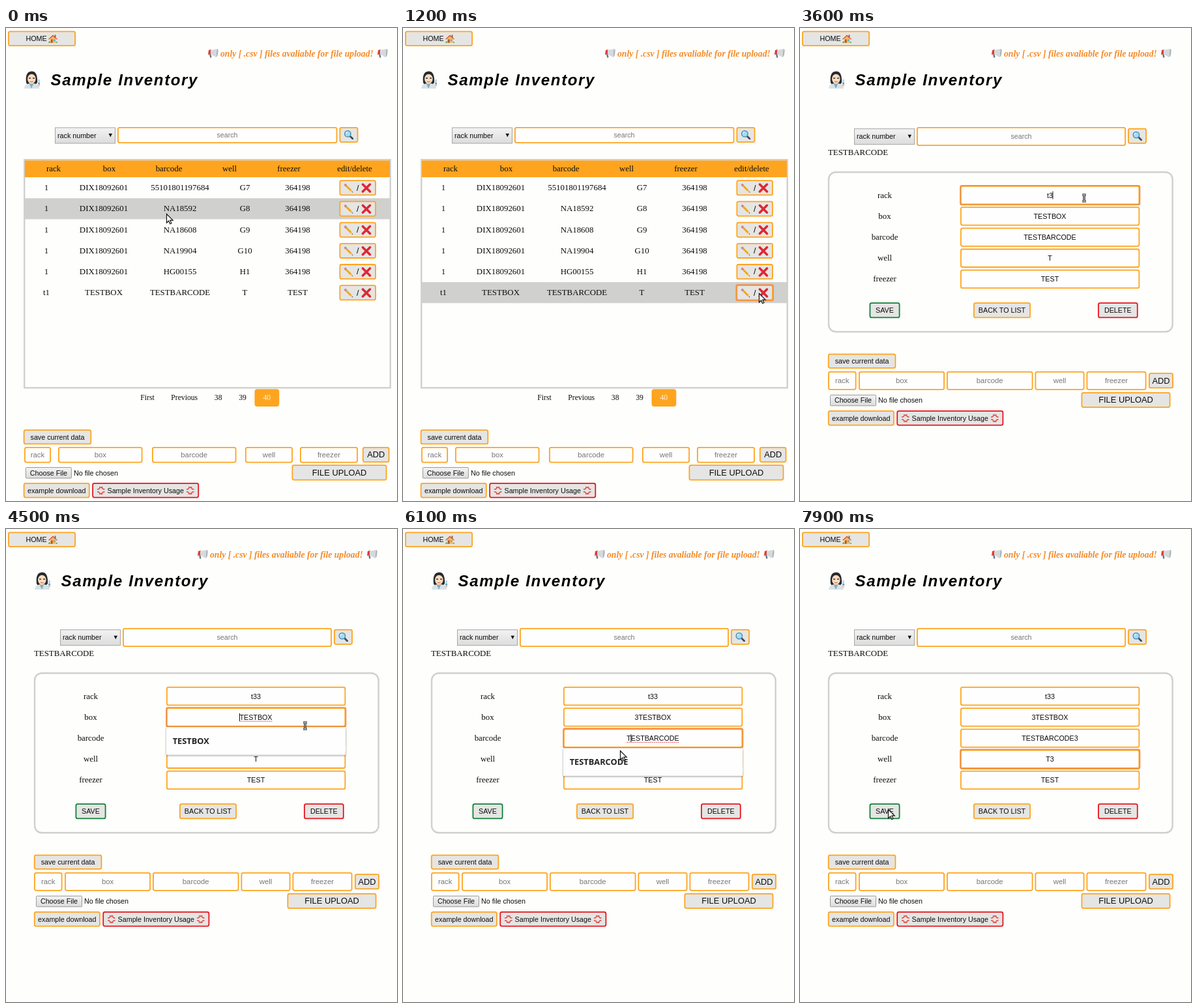
An HTML page that plays this animation: 600x726 px, repeating every 8000 ms.

```html
<!DOCTYPE html>
<html lang="en">
<head>
<meta charset="utf-8">
<title>Sample Inventory</title>
<style>
  html, body { margin: 0; width: 100%; height: 100%; overflow: hidden; background: #fefefd; }
  svg { display: block; }
  text { font: 10.72px "Liberation Sans", Arial, sans-serif; fill: #0c0c0c; white-space: pre; }
  .mid { text-anchor: middle; }
  .big { font-size: 12.86px; }
  .hint { font-size: 11.3px; fill: #777; }
  .serif { font: 12.86px "Liberation Serif", Times, serif; }
  .pager { font: 11.7px "Liberation Serif", Times, serif; }
  .current { fill: #fff3dd; }
  .notice { font: italic bold 13.67px "Liberation Serif", Times, serif; fill: #f58a26; }
  .title { font: italic bold 24.1px "Liberation Sans", Arial, sans-serif; letter-spacing: 1.61px; fill: #000; }
  .option { font: 600 12.8px "Noto Sans", sans-serif; fill: #222; }
  .popup { filter: drop-shadow(0 1px 1.5px #0006); }
</style>
</head>
<body>
<svg width="600" height="726" viewBox="0 0 600 726">
  <defs>
    <linearGradient id="grey" x2="0" y2="1">
      <stop stop-color="#f3f3f3"/><stop offset="1" stop-color="#dcdcdc"/>
    </linearGradient>
    <symbol id="house" viewBox="0 0 16 16">
      <path d="M11 1h2v5h-2z" fill="#8a5140"/>
      <path d="M3 7 8 3l5 4v8H3z" fill="#f4b860"/>
      <path d="M0 8.5 8 1l8 7.5-1 1-7-6-7 6z" fill="#d9512f"/>
      <path d="M4.500 9h3v6h-3z" fill="#a4563a"/><path d="M9 9h3v3H9z" fill="#5cb2d8"/>
      <path d="M0 14q3-4 4 1H0zM13 15q1-4 3-1v1z" fill="#65a844"/>
    </symbol>
    <symbol id="horn" viewBox="0 0 18 16">
      <path d="M2 3 6 2 5 9 1 10z" fill="#df3c38"/>
      <path d="M5 3 15 1l2 1-2 11-2 1-8-5z" fill="#d5d9dc"/>
      <path d="M15 1q3 2 0 12-2-1 0-12z" fill="#aab2b7"/>
      <path d="M3 9.500 5.500 9l1 5-2 1z" fill="#68747a"/>
    </symbol>
    <symbol id="scientist" viewBox="0 0 27 27">
      <path d="M4 18Q2 1 12 0.500T21 18l-3 3H6z" fill="#292a2f"/>
      <path d="M1 27q0-7 8-8h7q8 1 8 8z" fill="#d5e3ea"/>
      <path d="M9 17h6v4l-3 3-3-3z" fill="#e7b792"/>
      <ellipse cx="12.300" cy="12" rx="6.300" ry="7.300" fill="#f9dcc0"/>
      <path d="M5.500 11Q7 5 12 4q5 1 7 6-1-8-7-8t-6.500 9z" fill="#292a2f"/>
      <path d="M8 11h3M14 11h3" stroke="#383030" stroke-width="1.500"/>
      <path d="M10 16q2.300 1.500 4.600 0" stroke="#c0504c" fill="none"/>
      <path d="m9 20 3 7 3-7" fill="#80aebe"/>
      <path d="M22 13h3v10h-3z" fill="#b5dbe7"/><path d="M22 18h3v5h-3z" fill="#5ea6c8"/>
      <circle cx="23" cy="22" r="2" fill="#f3cba8"/>
    </symbol>
    <symbol id="lens" viewBox="0 0 16 16">
      <path d="m9.500 9.500 5 5" stroke="#454b50" stroke-width="3" stroke-linecap="round"/>
      <circle cx="6.300" cy="6.300" r="5" fill="#a5dcf4" stroke="#4b91b8" stroke-width="1.600"/>
      <path d="M3.500 6q0-2.500 2.500-3" stroke="#fff" fill="none"/>
    </symbol>
    <symbol id="pencil" viewBox="0 0 16 16">
      <path d="M0.500 3 3 0.500 5.500 3 3 5.500z" fill="#e8777a"/>
      <path d="M2.200 4.700 4.700 2.200 6 3.500 3.500 6z" fill="#9ca6aa"/>
      <path d="M3.500 6 6 3.500 13.500 11 11 13.500z" fill="#f7b62c"/>
      <path d="m4.700 4.800 7.600 7.500" stroke="#dc8d20"/>
      <path d="m11 13.500 2.500-2.500 2 4.500z" fill="#e8c59a"/><path d="m13.500 14.600 1-1 1 2z" fill="#333"/>
    </symbol>
    <symbol id="cross" viewBox="0 0 16 16">
      <path d="m2.500 2.500 11 11m0-11-11 11" stroke="#dc2932" stroke-width="3.600" stroke-linecap="round"/>
    </symbol>
    <symbol id="anger" viewBox="0 0 16 16">
      <g fill="none" stroke="#e0433d" stroke-width="1.700" stroke-linecap="round">
        <path d="M1.500 5.500Q6 6 5.500 1.500M10.500 1.500Q10 6 14.500 5.500M1.500 10.500Q6 10 5.500 14.500M10.500 14.500Q10 10 14.500 10.500"/>
        <path d="M7 1.500Q8 4 9 1.500M7 14.500Q8 12 9 14.500"/>
      </g>
    </symbol>
    <symbol id="arrow" viewBox="0 0 12 18" overflow="visible">
      <path d="M.5.500v13.500l3.200-3 2 4.700 2.200-1-2-4.500h4.300z" fill="#fff" stroke="#111" stroke-width="1.200"/>
    </symbol>
    <symbol id="beam" viewBox="0 0 10 14">
      <path d="M2 2h6M2 12h6M5 2v10" stroke="#111" stroke-width="3.200"/>
      <path d="M2 2h6M2 12h6M5 2v10" stroke="#fff" stroke-width="1"/>
    </symbol>
  </defs>
  <g id="scene"></g>
</svg>
<script>
const scene = document.getElementById('scene');
const LOOP = 8000, STEP = 100, EDIT_AT = 1300, PRESS_AT = 1200, ROW = 32.2;
const ORANGE = '#fea41f', RED = '#e5161d', GREEN = '#11803a', GREY = '#e5e5e4', LINE = '#d0d0d0';
const FIELDS = ['rack', 'box', 'barcode', 'well', 'freezer'];
const SAMPLES = [
  ['1', 'DIX18092601', '55101801197684', 'G7', '364198'],
  ['1', 'DIX18092601', 'NA18592', 'G8', '364198'],
  ['1', 'DIX18092601', 'NA18608', 'G9', '364198'],
  ['1', 'DIX18092601', 'NA19904', 'G10', '364198'],
  ['1', 'DIX18092601', 'HG00155', 'H1', '364198'],
  ['t1', 'TESTBOX', 'TESTBARCODE', 'T', 'TEST']
];

// time, x, y of the pointer
const PATH = [
  [0, 246, 285], [800, 500, 668], [900, 500, 668], [1000, 530, 500], [1100, 546, 407],
  [1600, 546, 407], [2200, 436, 261], [4000, 436, 261], [4500, 459, 302], [4900, 459, 302],
  [5300, 505, 322], [5700, 256, 328], [5900, 349, 322], [6100, 333, 340], [6700, 333, 340],
  [7000, 367.5, 354], [7200, 367.5, 354], [7600, 145, 460], [7900, 135, 430]
];

// time, focused field, its value, caret index, suggestion
const EDITS = [
  [2500, 0, 't1', 2, 't1'], [3200, 0, 't', 1, 't1'], [3600, 0, 't3', 2], [3800, 0, 't33', 3],
  [4300, 1, 'TESTBOX', 0, 'TESTBOX'], [4900, 1, '3TESTBOX', 1],
  [5900, 2, 'TESTBARCODE', 1, 'TESTBARCODE'], [6600, 2, 'TESTBARCODE3', 12],
  [6900, 3, 'T', 0, 'T'], [7300, 3, 'T', 1, 'T'], [7500, 3, 'T3', 2], [7700, 3, 'T3', -1]
];

const rect = (x, y, x2, y2, attrs) =>
  `<rect x="${x}" y="${y}" width="${x2 - x}" height="${y2 - y}" ${attrs}/>`;
const box = (x, y, x2, y2, stroke = ORANGE, fill = '#fefefe') =>
  rect(x + .9, y + .9, x2 - .9, y2 - .9, `rx="2.500" fill="${fill}" stroke="${stroke}" stroke-width="1.800"`);
const ring = (x, y, x2, y2) =>
  rect(x, y, x2, y2, 'rx="2.500" fill="none" stroke="#f0914c" stroke-width="1.700"');
const text = (x, y, str, cls = '') => `<text x="${x}" y="${y}" class="${cls}">${str}</text>`;
const mid = (x, y, str, cls = '') => text(x, y, str, 'mid ' + cls);
const icon = (id, x, y, w, h = w) => `<use href="#${id}" x="${x}" y="${y}" width="${w}" height="${h}"/>`;
const button = (x, y, x2, y2, label, stroke = ORANGE, cls = '') =>
  box(x, y, x2, y2, stroke, GREY) + mid((x + x2) / 2, (y + y2) / 2 + (cls ? 4.3 : 4), label, cls);

function pointerAt(t) {
  const next = PATH.findIndex(p => p[0] > t);
  if (next < 0) return PATH[PATH.length - 1].slice(1);
  const [a, b] = [PATH[next - 1], PATH[next]];
  const k = (t - a[0]) / (b[0] - a[0]);
  return [a[1] + (b[1] - a[1]) * k, a[2] + (b[2] - a[2]) * k];
}

function header(dx) {
  return box(3, 4.5, 107, 28, ORANGE, GREY) + text(30.5, 20.3, 'HOME') + icon('house', 65, 9.5, 14) +
    icon('horn', 309 + dx, 31, 18, 16) + icon('horn', 569 + dx, 31, 18, 16) +
    text(329 + dx, 43.7, 'only [ .csv ] files avaliable for file upload!', 'notice') +
    icon('scientist', 27 - dx, 66, 27) + text(68.5 - dx, 88, 'Sample Inventory', 'title');
}

function searchBar(x, y, field, go) {
  return rect(x + .5, y + .5, x + 92.5, y + 24.5, 'fill="url(#grey)" stroke="#a5a5a5"') +
    text(x + 4, y + 16.2, 'rack number') +
    `<path d="M${x + 82.5} ${y + 9.5}h5.500l-2.750 5.500z" fill="#111"/>` +
    box(...field) + mid(339.5, (field[1] + field[3]) / 2 + 3.6, 'search', 'hint" style="font-size:10.72px') +
    box(go, y - .5, go + 29, y + 23.5, ORANGE, GREY) + icon('lens', go + 7, y + 4, 15);
}

function entryForm(x, y, inputs, inputY, add, upload, fileY, lastY) {
  const chooseX = x + 3.7;
  return button(x, y, x + 104.5, y + 23, 'save current data') +
    inputs.map(([a, b], i) =>
      box(a, inputY[0], b, inputY[1]) + mid((a + b) / 2, (inputY[0] + inputY[1]) / 2 + 4, FIELDS[i], 'hint')).join('') +
    button(...add, 'ADD', ORANGE, 'big') + button(...upload, 'FILE UPLOAD', ORANGE, 'big') +
    rect(chooseX, fileY, chooseX + 70, fileY + 16.5, 'fill="url(#grey)" stroke="#999" rx="1"') +
    mid(chooseX + 35, fileY + 12, 'Choose File') + text(x + 77.3, fileY + 12, 'No file chosen') +
    button(x, lastY, x + 102, lastY + 23.5, 'example download') +
    button(x + 105.5, lastY, x + 269.5, lastY + 23.5, 'Sample Inventory Usage', RED) +
    icon('anger', x + 112.5, lastY + 5.5, 13) + icon('anger', x + 249.5, lastY + 5.5, 13);
}

function listPage(t, [, py]) {
  const rowX = [62, 150, 267, 366.5, 447.5];
  const headX = [73, 158.5, 250, 343, 434, 535];
  const rows = SAMPLES.map((sample, i) => {
    const top = 229.1 + ROW * i;
    const hover = py >= top && py < top + ROW;
    return (hover ? rect(29, top, 589.5, top + ROW, 'fill="#d0d0cf"') : '') +
      sample.map((v, c) => mid(rowX[c], top + 20, v, 'serif')).join('') +
      button(511.5, top + 4.2, 568, top + 28.2, '/', ORANGE, 'big') +
      icon('pencil', 518, top + 9, 15) + icon('cross', 545, top + 8.5, 16) +
      (i === 5 && t >= PRESS_AT ? ring(511.3, top + 4, 568.2, top + 28.4) : '');
  }).join('');
  return header(0) + searchBar(75, 152.5, [171, 152, 508.5, 177], 511.5) +
    rect(28.2, 202.2, 589.8, 552.3, `fill="none" stroke="${LINE}" stroke-width="2.400"`) +
    rect(29, 203.3, 589, 229.1, `fill="${ORANGE}"`) +
    [...FIELDS, 'edit/delete'].map((h, i) => mid(headX[i], 220.3, h, 'serif')).join('') + rows +
    rect(381.5, 554.3, 419.3, 581, `rx="4" fill="${ORANGE}"`) +
    mid(217, 571, 'First', 'pager') + mid(273.7, 571, 'Previous', 'pager') +
    mid(325.7, 571, '38', 'pager') + mid(363, 571, '39', 'pager') + mid(400.3, 571, '40', 'pager current') +
    entryForm(26.7, 616.3, [[28, 69], [80, 209.5], [224, 353.5], [367, 440], [451, 540]], [643, 667.5],
      [547, 643, 588.5, 667], [438.5, 670.3, 584.5, 694.5], 674.5, 698);
}

function editPage(t) {
  const values = [...SAMPLES[5]];
  const done = EDITS.filter(e => e[0] <= t);
  done.forEach(e => values[e[1]] = e[2]);
  const [, focus = -1, , caret = -1, hint] = done[done.length - 1] || [];
  const fieldTop = i => 242 + ROW * i;
  const fields = FIELDS.map((name, i) => {
    const y = fieldTop(i);
    return mid(130, y + 18.5, name, 'serif') + box(246, y, 521.3, y + 29.3) +
      (i === focus ? ring(246, y - .2, 521.5, y + 29.5) : '') +
      `<text id="${name}" class="mid" x="383.500" y="${y + 18.6}">${values[i]}</text>`;
  }).join('');
  const popTop = fieldTop(focus) + 30;
  const popup = hint ? rect(246, popTop, 521.3, popTop + 42.5, 'fill="#fefefe" class="popup"') +
    text(255.7, popTop + 25.5, hint, 'option') : '';
  scene.innerHTML = header(-16) + searchBar(83, 154.2, [179, 152, 500, 181], 503) +
    text(43, 195, 'TESTBARCODE', 'serif') +
    rect(44, 221.2, 571.7, 466.3, `rx="11" fill="none" stroke="${LINE}" stroke-width="2.400"`) + fields +
    button(106.5, 421.3, 153.5, 445.3, 'SAVE', GREEN) + button(266, 421.3, 354, 445.3, 'BACK TO LIST') +
    button(457, 421.3, 518.7, 445.3, 'DELETE', RED) +
    entryForm(42.8, 499.7, [[43, 86.5], [90, 222], [225, 357.5], [360.5, 436.5], [439.5, 531.5]], [527, 555.7],
      [535, 529.3, 573, 553.3], [431.5, 559, 568.5, 583], 563.3, 587) + popup;
  if (focus < 0 || caret < 0) return { focus, hint };

  // The caret and spelling line follow the measured value
  const node = document.getElementById(FIELDS[focus]);
  const width = node.getComputedTextLength(), left = 383.5 - width / 2, y = fieldTop(focus);
  const caretX = left + (caret ? node.getSubStringLength(0, caret) : 0);
  let marks = `<path d="M${caretX} ${y + 8.7}v12" stroke="#111"/>`;
  if (hint && hint.length > 3)
    marks += `<path d="M${left} ${y + 21}h${width}" stroke="#e5484d" stroke-dasharray="2 1"/>`;
  scene.insertAdjacentHTML('beforeend', marks);
  return { focus, hint };
}

function pointer([x, y], overField) {
  return overField ? icon('beam', x - 5, y - 7, 10, 14) : icon('arrow', x, y, 12, 18);
}

function render(t) {
  const pos = pointerAt(t);
  let overField = false;
  if (t < EDIT_AT) {
    scene.innerHTML = listPage(t, pos);
  } else {
    const { focus, hint } = editPage(t);
    const [x, y] = pos, row = Math.floor((y - 242) / ROW);
    const onPopup = hint && y > 271.5 + ROW * focus && y < 314.5 + ROW * focus;
    overField = x > 246 && x < 521 && row >= 0 && row < 5 && y - 242 - row * ROW < 29.3 && !onPopup;
  }
  scene.insertAdjacentHTML('beforeend', pointer(pos, overField));
}

let shown = -1;
const start = performance.now();
function tick() {
  const t = Math.floor((performance.now() - start) % LOOP / STEP) * STEP;
  if (t !== shown) render(shown = t);
  requestAnimationFrame(tick);
}
tick();
</script>
</body>
</html>
```
